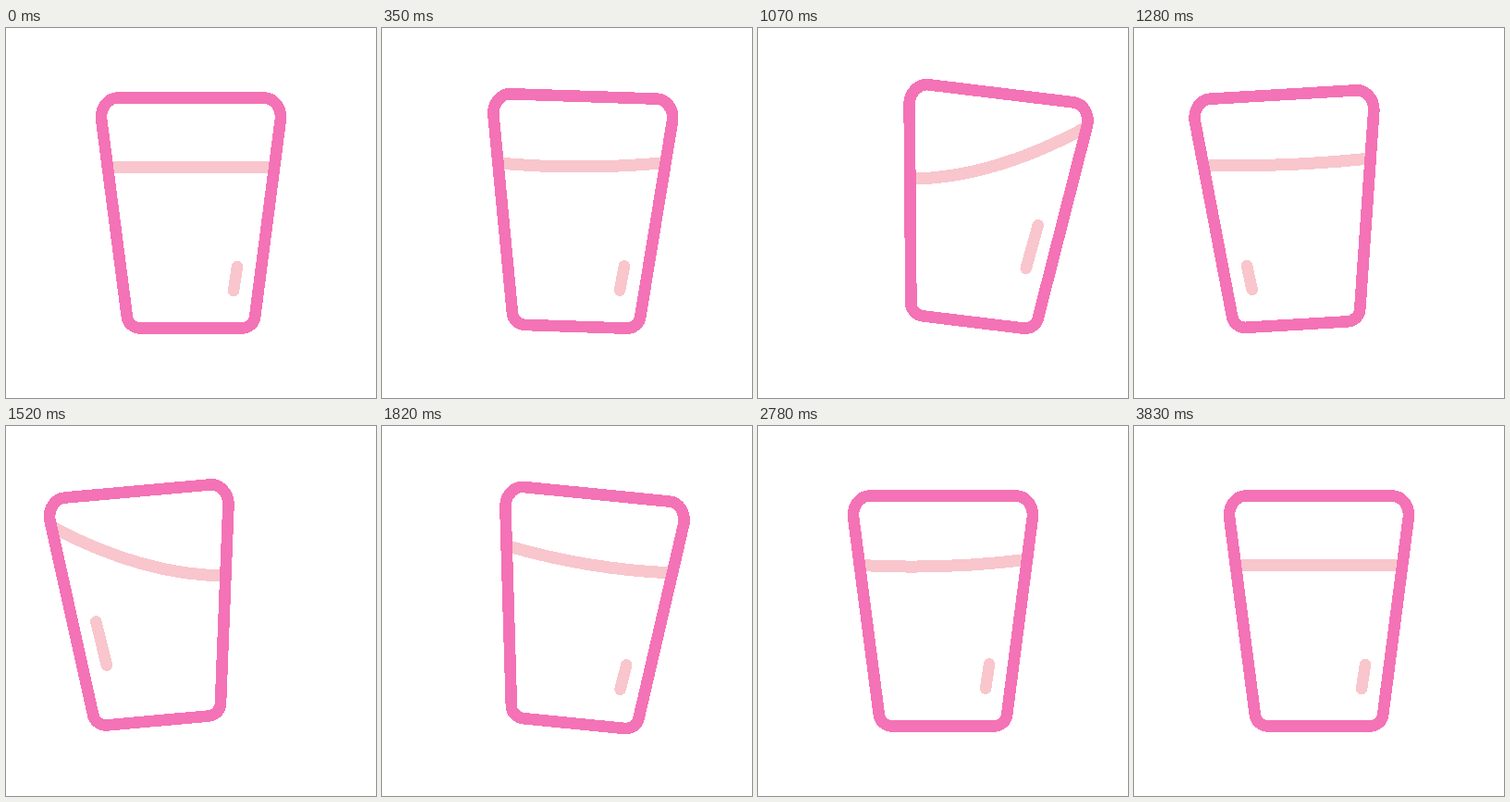
An HTML page that plays this animation: 400 px wide and 400 px high, repeating every 3.89 s.

```html
<!DOCTYPE html>
<html lang="en">
<head>
<meta charset="utf-8">
<title>Sloshing glass</title>
<style>
  html, body { margin: 0; width: 100%; height: 100%; overflow: hidden; background: #fff; }
  svg { display: block; width: 100%; height: 100%; fill: none; stroke-linecap: round; shape-rendering: crispEdges; }
</style>
</head>
<body>
<svg viewBox="0 0 400 400">
  <g id="glass">
    <g stroke="#f8c6cc">
      <path id="liquid" stroke-width="13"/>
      <path id="shine" stroke-width="12.5"/>
    </g>
    <path stroke="#f472b6" stroke-width="12.6" d="M121 75.5H279A18 21 0 0 1 297 97.5L269.3 311A14.5 14 0 0 1 255 324.5H145A14.5 14 0 0 1 130.7 311L103 97.5A18 21 0 0 1 121 75.5Z"/>
  </g>
</svg>
<script>
const LOOP = 3890, LEVEL = 150.5;
const [glass, liquid, shine] = ['glass', 'liquid', 'shine'].map(id => document.getElementById(id));

// Turning points: [time, shift, angle] of the glass and [time, tilt] of the liquid
const swings = [[210, 0, 0], [730, 81, 11.3], [895, 81, 11.3], [1430, -56, -6.6], [1835, 20, 5.7], [2340, 0, 0]];
const sloshes = [[250, 0], [800, 40], [1040, 40], [1490, -35], [2080, 14], [2450, -9], [2850, 4], [3300, -2], [3700, 0]];

const ease = u => (1 - Math.cos(Math.PI * u)) / 2;
const mix = (a, b, u) => a + (b - a) * u;

function pose(keys, t) {
  const next = keys.findIndex(key => key[0] > t);
  if (next < 1) return keys.at(next);
  const from = keys[next - 1], to = keys[next];
  const u = ease((t - from[0]) / (to[0] - from[0]));
  return from.map((value, i) => mix(value, to[i], u));
}

const sideX = y => 110 + (y - LEVEL) * 0.13;
const shineX = y => 250 - (y - 258) * 0.154;

function draw(t) {
  const [, shift, angle] = pose(swings, t);
  const [, tilt] = pose(sloshes, t);
  glass.setAttribute('transform', `translate(${shift} ${-Math.abs(shift) / 8.5}) rotate(${angle} 200 200)`);

  const dip = 2.9 * Math.sqrt(Math.abs(tilt));
  const left = LEVEL - 0.6 * dip + tilt, right = LEVEL - 0.6 * dip - tilt;
  liquid.setAttribute('d', `M${sideX(left)} ${left}Q200 ${LEVEL + dip} ${400 - sideX(right)} ${right}`);

  // The highlight stretches upwards with the slosh, on the side the glass moved to
  const stretch = Math.min(1, (tilt / 28) ** 2);
  const top = mix(258, 212, stretch), end = mix(284, 260, stretch);
  shine.setAttribute('d', `M${shineX(top)} ${top}L${shineX(end)} ${end}`);
  shine.setAttribute('transform', shift < 0 ? 'translate(400) scale(-1 1)' : '');
}

const start = performance.now();
function tick() {
  draw((performance.now() - start) % LOOP);
  requestAnimationFrame(tick);
}
tick();
</script>
</body>
</html>
```
